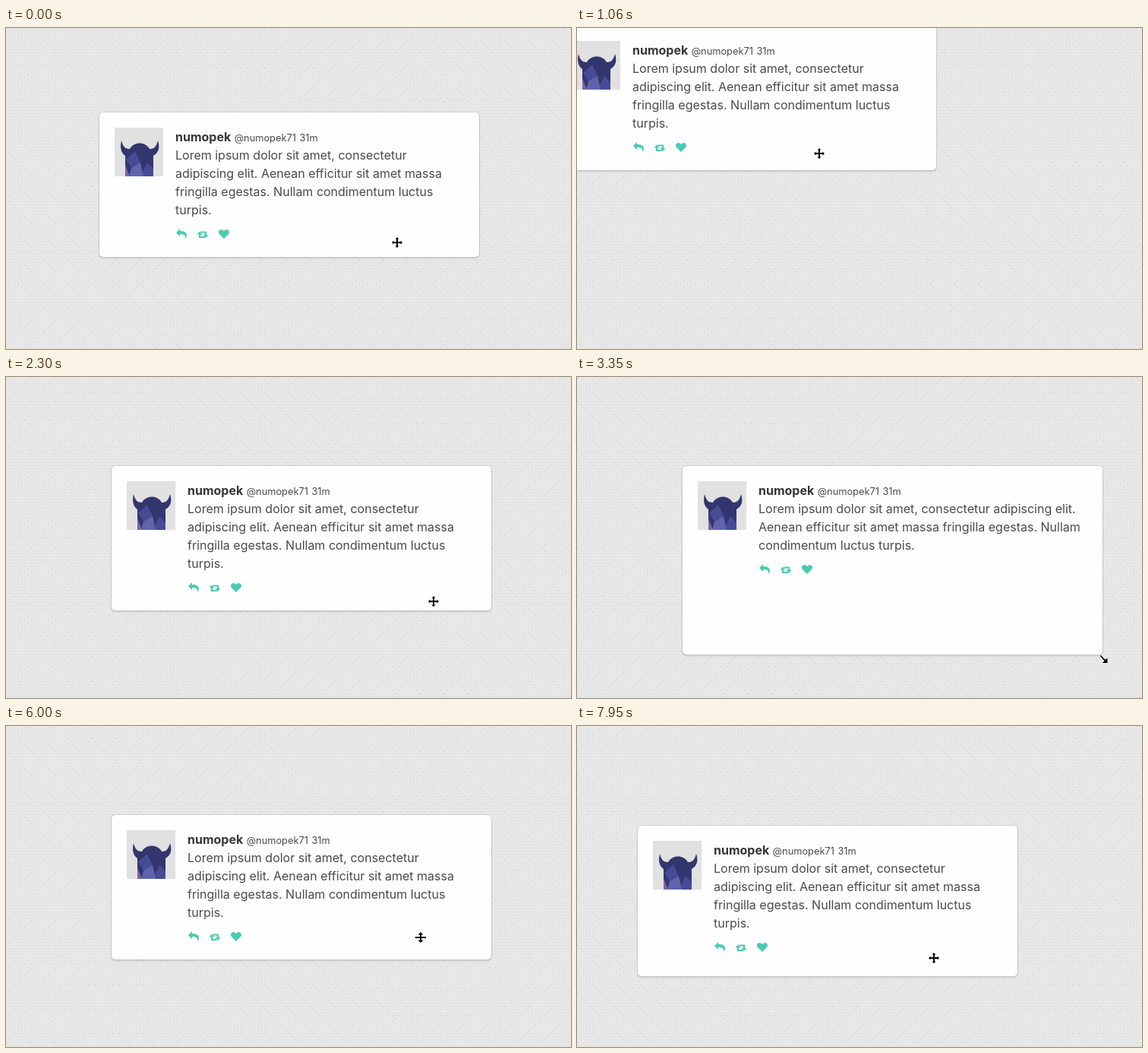
Recreate the animation shown at these times as an HTML page with a canvas. Size 744 by 422 pixels, loop 8000 ms.

```html
<!DOCTYPE html>
<html lang="en">
<head>
<meta charset="utf-8">
<title>Draggable card</title>
<style>
  html, body { margin: 0; width: 100%; height: 100%; overflow: hidden; }
  body { position: relative; background: #e8e8e8; font: 16px/1.5 Inter, sans-serif; color: #4a4a4a; }
  #weave { position: absolute; left: 0; top: 0; }
  #card {
    position: absolute; left: 0; top: 0; box-sizing: border-box; padding: 20px;
    display: flex; gap: 16px; background: #fefefe; border-radius: 5px;
    box-shadow: 0 2px 3px rgba(10, 10, 10, .1), 0 0 0 1px rgba(10, 10, 10, .1);
  }
  #avatar { flex: none; width: 64px; height: 64px; }
  strong { color: #363636; font-weight: 700; }
  small { font-size: 12.8px; }
  #icons { display: block; margin-top: 8px; fill: #4acbb0; }
  #cursor { position: absolute; left: 0; top: 0; overflow: visible; }
  #cursor path { stroke: #fff; stroke-width: 2; stroke-linejoin: round; paint-order: stroke; }
</style>
</head>
<body>
<canvas id="weave" width="744" height="422"></canvas>
<div id="card">
  <svg id="avatar" viewBox="0 0 64 64">
    <rect width="64" height="64" fill="#e1e1e1"/>
    <path fill="#33356e" d="M14 64V37C8 33 7 25 9 17C11 25 14 28 20 28C25 18 41 18 46 28C52 28 55 25 57 17C60 26 58 33 51 37V64Z"/>
    <path fill="#454c95" d="M15 42L27 31L34 46L22 53ZM34 64L43 46L51 54V64Z"/>
    <path fill="#5f64ab" d="M22 53L34 46L38 64H19Z"/>
    <path fill="#7d62a8" d="M14 49L20 64H14Z"/>
  </svg>
  <div>
    <strong>numopek</strong> <small>@numopek71</small> <small>31m</small><br>
    Lorem ipsum dolor sit amet, consectetur adipiscing elit. Aenean efficitur sit amet massa fringilla egestas. Nullam condimentum luctus turpis.
    <svg id="icons" width="80" height="24">
      <path transform="translate(1 5)" d="M0 5L5 0V3C11 3 14 5 14 8.500Q14 11 12 13C13 8 10 7 5 7V10Z"/>
      <path transform="translate(28.500 7)" d="M3.500 1.500L7 5.500H4.700V8H9.200L11 10H2.500V5.500H0ZM11.500 10L15 5.900H12.600V1.500H4.200L5.800 3.500H10.400V5.900H8Z"/>
      <path transform="translate(57 6)" d="M7 12L1 6C-1.500 3 1 -.500 4 0Q6 .300 7 2Q8 .300 10 0C13 -.500 15.500 3 13 6Z"/>
    </svg>
  </div>
</div>
<svg id="cursor" width="1" height="1"><path/></svg>
<script>
const LOOP = 8000, MIN_W = 500, MIN_H = 190;
const card = document.getElementById('card');
const cursor = document.getElementById('cursor');

const shapes = {
  move: 'M0-7L2.500-4.500H1V-1H4.500V-2.500L7 0L4.500 2.500V1H1V4.500H2.500L0 7L-2.500 4.500H-1V1H-4.500V2.500L-7 0L-4.500-2.500V-1H-1V-4.500H-2.500Z',
  corner: 'M-5.500-4.500L-4.500-5.500L1.800 .800L4.500-2V5H-2.500L.500 2.200Z',
  edge: 'M0-7L3.500-3.500H1V-1H7V1H1V3.500H3.500L0 7L-3.500 3.500H-1V1H-7V-1H-1V-3.500H-3.500Z'
};

// The pointer glides to x, y in equal steps; while dragging it takes the card along
const moves = [];
function glide(start, end, steps, x, y, shape, { drag = false, ease = 2, easeY = ease } = {}) {
  const step = (end - start) / (steps - 1) || 1;
  moves.push({ start, steps, step, x, y, shape, drag, ease, easeY });
}
const drag = true;
glide(800, 1150, 5, 279, 165, 'move', { drag, ease: 1.1, easeY: 4 });
glide(1330, 1600, 4, 485, 273, 'move', { drag, ease: 3 });
glide(1690, 2030, 5, 531, 288, 'move', { drag, ease: 3 });
glide(2300, 2730, 6, 637, 312, 'move');
glide(3000, 3000, 1, 638, 312, 'corner');
glide(3260, 3530, 4, 709, 388, 'corner', { drag, ease: 2.2 });
glide(3700, 4240, 7, 613, 332, 'corner', { drag });
glide(4590, 4590, 1, 609, 326, 'edge');
glide(4680, 4940, 4, 580, 311, 'move');
glide(5030, 5290, 4, 554, 330, 'edge');
glide(5830, 6090, 4, 545, 275, 'edge', { drag });
glide(6180, 6350, 3, 535, 359, 'edge', { drag });
glide(6620, 6880, 4, 524, 319, 'edge', { drag });
glide(7240, 7410, 3, 529, 291, 'move');
glide(7770, 7950, 3, 470, 305, 'move', { drag, ease: 5 });

const easeOut = (k, power) => 1 - (1 - k) ** power;

function pointAt(move, from, k) {
  return {
    x: from.x + (move.x - from.x) * easeOut(k, move.ease),
    y: from.y + (move.y - from.y) * easeOut(k, move.easeY)
  };
}

function advance(pose, move, t) {
  const count = Math.min(move.steps, Math.floor((t - move.start + 8) / move.step) + 1);
  const from = pose.pointer;
  const pointer = pointAt(move, from, count / move.steps);
  const next = { ...pose, pointer, shape: move.shape };
  if (!move.drag) return next;
  if (move.shape === 'move') {
    // A carried card trails one step behind, and catches up once the move is over
    const trail = t === Infinity ? pointer : pointAt(move, from, (count - 1) / move.steps);
    next.x = pose.x + trail.x - from.x;
    next.y = pose.y + trail.y - from.y;
  } else if (move.shape === 'corner') {
    next.w = Math.max(MIN_W, pointer.x - pose.x - 2);
    next.h = Math.max(MIN_H, pointer.y - pose.y - 6);
  } else {
    next.h = Math.max(MIN_H, pointer.y - pose.y - 4);
  }
  return next;
}

function poseAt(t) {
  const rest = { x: 123, y: 111, w: MIN_W, h: MIN_H, pointer: { x: 515, y: 282 }, shape: 'move' };
  const begun = moves.filter(move => move.start <= t);
  return begun.reduce((pose, move, i) => advance(pose, move, i < begun.length - 1 ? Infinity : t), rest);
}

// Diagonal herringbone: bricks hatched across or down, with dotted seams
function drawWeave() {
  const tile = document.createElement('canvas');
  tile.width = tile.height = 64;
  const pen = tile.getContext('2d');
  for (let y = 0; y < 64; y++) {
    for (let x = 0; x < 64; x++) {
      const u = x + y, v = x - y + 64;
      const part = (Math.floor(u / 32) - Math.floor(v / 32)) & 3;
      const across = part < 2;
      const uSeam = u % 32 < 2 && part !== 1, vSeam = v % 32 < 2 && part !== 2;
      const line = across ? y % 4 === 0 && x % 2 : x % 4 === 0 && y % 2;
      const seam = (uSeam || vSeam) && x % 4 < 2;
      pen.fillStyle = seam ? '#dcdcdc' : line ? '#dedede' : '#e8e8e8';
      pen.fillRect(x, y, 1, 1);
    }
  }
  const stage = document.getElementById('weave').getContext('2d');
  stage.fillStyle = stage.createPattern(tile, 'repeat');
  stage.fillRect(0, 0, 744, 422);
}

const shift = ({ x, y }) => `translate(${Math.round(x)}px, ${Math.round(y)}px)`;

function render() {
  const pose = poseAt(performance.now() % LOOP);
  card.style.transform = shift(pose);
  card.style.width = Math.round(pose.w) + 'px';
  card.style.height = Math.round(pose.h) + 'px';
  cursor.style.transform = shift(pose.pointer);
  cursor.firstChild.setAttribute('d', shapes[pose.shape]);
  requestAnimationFrame(render);
}

drawWeave();
render();
</script>
</body>
</html>
```
